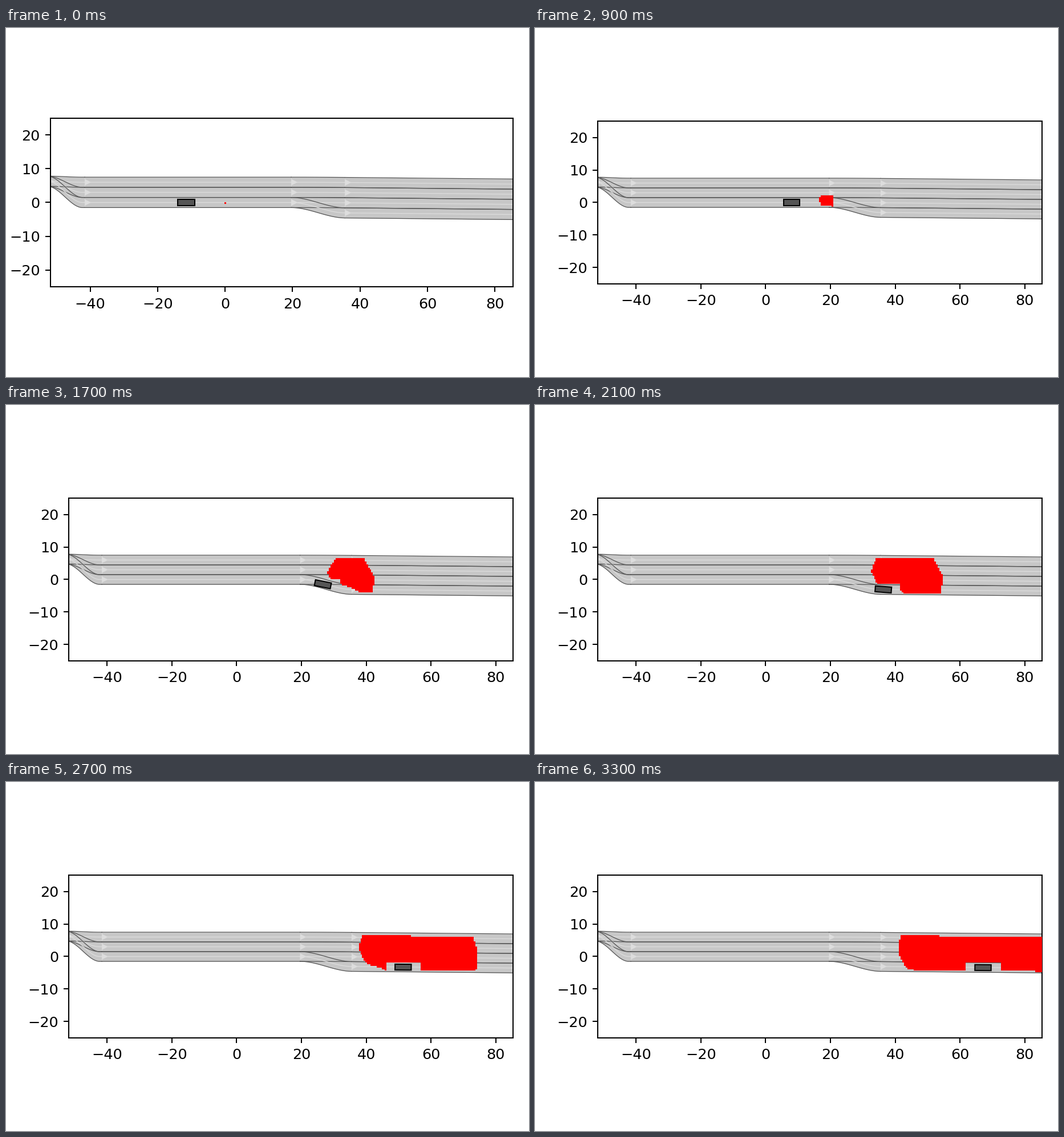
Recreate the animation shown at these times as a matplotlib script. Size 917x611 px, loop 3400 ms.

```python
import numpy as np
import matplotlib.pyplot as plt
from matplotlib.animation import FuncAnimation
from matplotlib.patches import Polygon

W, H, DPI = 917, 611, 183.4
FRAMES, STEP_MS = 34, 100
XLIM, YLIM = (-51.8, 85.4), (-25, 25)
FORK, MAIN, RAMP, OPEN = -52.6, -41.6, 19.6, 35.5  # lane section borders
CAR_LEN, CAR_WID, CLEARANCE = 5, 1.8, 5.35
CELL = 0.5

plt.rcParams["font.family"] = "DejaVu Sans"
plt.rcParams["font.size"] = 10
fig = plt.figure(figsize=(5, 3.33152), dpi=DPI, facecolor="white")
ax = fig.add_axes([0.1, 0.2, 0.8, 0.6])


def smooth(x, x0, x1):
    t = np.clip((x - x0) / (x1 - x0), 0, 1)
    return t * t * (3 - 2 * t)


def bend(x):
    """Slow drift of the road to the right after the straight part."""
    d = np.clip(x - RAMP, 0, OPEN - RAMP)
    return -0.0095 * (d * d / (2 * (OPEN - RAMP)) + np.maximum(x - OPEN, 0))


def ramp_drop(x):
    return -3 * smooth(x, RAMP, OPEN) + bend(x)


def turn(points, ang):
    c, s = np.cos(ang), np.sin(ang)
    return np.array(points) @ np.array([[c, s], [-s, c]])


def draw_lane(x, mid):
    ax.fill_between(x, mid - 1.5, mid + 1.5, color="#c7c7c7", lw=0, snap=False, zorder=9)
    for side in (-1.5, 1.5):
        ax.plot(x, mid + side, color="#555555", lw=0.5, snap=False, zorder=10)
    ax.plot(x, mid, color="#dddddd", lw=0.5, snap=False, zorder=10)
    ang = np.arctan2(mid[1] - mid[0], x[1] - x[0])
    head = turn([(0, -0.95), (1.9, 0), (0, 0.95)], ang) + (x[0], mid[0])
    ax.add_patch(Polygon(head, fc="#dddddd", lw=0, zorder=11))


def draw_road():
    fork = np.linspace(FORK, MAIN, 40)
    main = np.linspace(MAIN, RAMP, 20)
    ramp = np.linspace(RAMP, OPEN, 40)
    tail = np.linspace(OPEN, 90, 40)
    for y in (6, 3, 0):
        draw_lane(fork, 6.3 + (y - 6.3) * smooth(fork, FORK, MAIN - 0.7))
        draw_lane(main, np.full_like(main, y))
        draw_lane(ramp, y + bend(ramp))
        draw_lane(tail, y + bend(tail))
    draw_lane(ramp, ramp_drop(ramp))
    draw_lane(tail, ramp_drop(tail))


def car_x(n):
    return -11.5 + 2.095 * n + 0.0087 * n * n


def car_y(x):
    return -3.05 * smooth(x, 15.5, 38.5) + bend(x)


def car_outline(n):
    x = car_x(n)
    ang = np.arctan2(car_y(x + 0.1) - car_y(x - 0.1), 0.2)
    a, b = CAR_LEN / 2, CAR_WID / 2
    return turn([(-a, -b), (a, -b), (a, b), (-a, b)], ang) + (x, car_y(x))


def reach_outline(n):
    """Stepped outline of the area that can be reached at step n."""
    back = -0.2 + 2.086 * n - 0.0252 * n * n
    front = 0.3 + 2.056 * n + 0.0253 * n * n
    edges = np.linspace(back, front, max(1, round((front - back) / CELL)) + 1)
    x = (edges[1:] + edges[:-1]) / 2
    u, w = edges[:-1] - back, front - edges[1:]
    nose = 1.4 + 0.025 * (n - 18) ** 2

    # sideways reach, road edge, then the cut corners at back and front
    hi = np.minimum(0.5 + 0.0235 * n * n, 6.75 + bend(x))
    hi = np.minimum(hi, 0.3 + 0.15 * n + n / 10 * u)
    hi = np.minimum(hi, nose + n / 10 * w)

    lo = np.maximum(-0.6 - 0.0125 * n * n, -1.37 + ramp_drop(x))
    lo = np.maximum(lo, -1.4 - 0.2 * max(n - 21, 0) - 0.03 * u * u)
    lo = np.maximum(lo, 1.7 - 0.0135 * (n - 21) ** 2 - 1.8 * u)
    lo = np.maximum(lo, -0.5 - nose - 5 * w)

    # keep clear of the car
    cx = car_x(n)
    near = np.abs(x - cx) < CLEARANCE
    lo = np.where(near, np.maximum(lo, car_y(cx) + 1.3), lo)

    hi = np.floor(hi / CELL) * CELL + 0.12
    lo = np.ceil((lo + 0.4) / CELL) * CELL - 0.4
    xs = np.repeat(edges, 2)[1:-1]
    upper = np.column_stack([xs, np.repeat(hi, 2)])
    lower = np.column_stack([xs, np.repeat(lo, 2)])
    return np.vstack([upper, lower[::-1]])


def place_axes(left, right=889.4):
    width = right - left
    height = width * (YLIM[1] - YLIM[0]) / (XLIM[1] - XLIM[0])
    ax.set_position([left / W, 0.5 - height / H / 2, width / W, height / H])


draw_road()
ax.set(xlim=XLIM, ylim=YLIM, xticks=range(-40, 81, 20), yticks=range(-20, 21, 10))
ax.tick_params(axis="x", pad=3.9)
for spine in ax.spines.values():
    spine.set_zorder(12)
reach = ax.add_patch(Polygon(reach_outline(0), fc="red", lw=0, zorder=18))
car = ax.add_patch(Polygon(car_outline(0), fc="#555555", ec="black", lw=0.8, zorder=20))


def update(n):
    place_axes(77.7 if n == 0 else 110.1)
    reach.set_xy(reach_outline(n))
    car.set_xy(car_outline(n))
    return reach, car


anim = FuncAnimation(fig, update, frames=FRAMES, interval=STEP_MS,
                     repeat=True, repeat_delay=0, blit=False)
plt.show()
```
